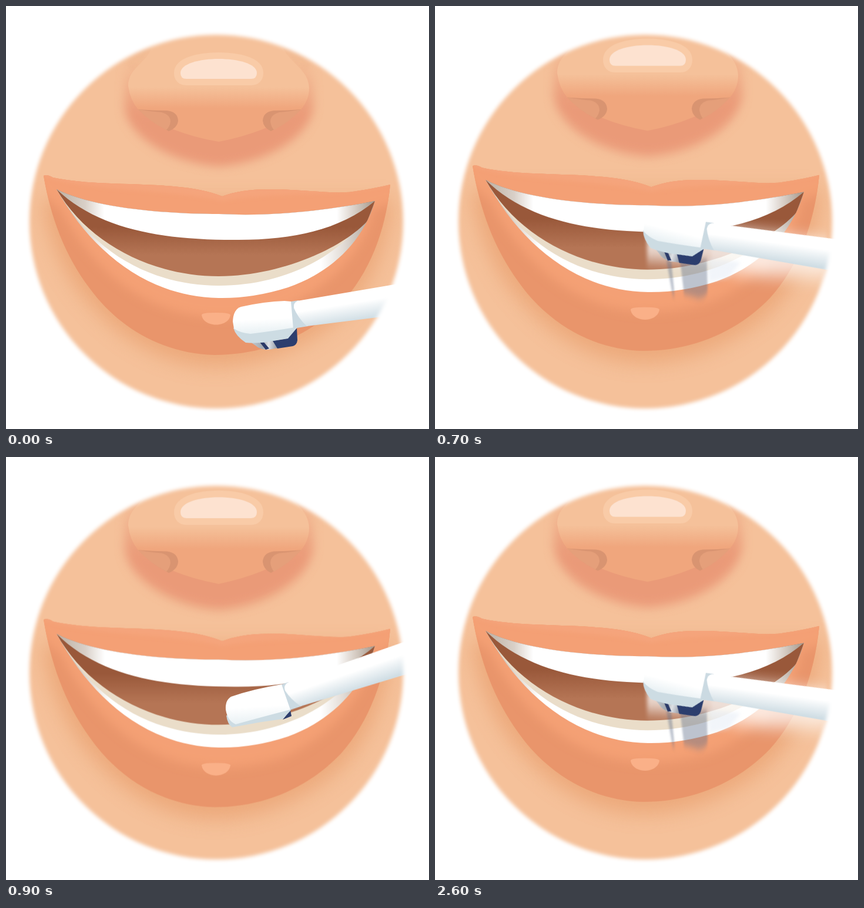
An HTML page that plays this animation: 720x720 px, repeating every 2800 ms.

```html
<!DOCTYPE html>
<html lang="en">
<head>
<meta charset="utf-8">
<title>Brushing</title>
<style>
  html, body { margin: 0; width: 100%; height: 100%; overflow: hidden; background: #fff; }
  svg { display: block; width: 100%; height: 100%; }
  .face, .brush, .side, .rolled, .back, .blur { animation: 2800ms step-end infinite; }
  .face { transform-origin: 0 0; animation-name: stretch; }
  .brush { transform-origin: 487px 503px; animation-name: move; }
  .side { animation-name: side; }
  .rolled { animation-name: rolled; }
  .back { animation-name: back; }
  .blur { animation-name: blur; }

  @keyframes stretch {
    0% { transform: none; }
    25%, 92.857% { transform: matrix(1, 0, 0, 1.0324, 0, -26.2); }
    32.143% { transform: matrix(1, 0, 0, 1.0466, 0, -25.7); }
    39.286% { transform: matrix(1, 0, 0, 1.0445, 0, -28.4); }
    100% { transform: none; }
  }
  @keyframes move {
    0% { transform: none; }
    17.857% { transform: translate(8px, 41px) rotate(-5.5deg); }
    25%, 92.857% { transform: translate(-24px, -135px) rotate(17deg); }
    32.143% { transform: translate(-17px, -116px) rotate(-9.7deg); }
    39.286% { transform: translate(-21px, -105px) rotate(-20deg); }
    100% { transform: none; }
  }
  @keyframes side { 0%, 92.857%, 100% { opacity: 1; } 32.143% { opacity: 0; } }
  @keyframes rolled { 0%, 39.286%, 100% { opacity: 0; } 32.143% { opacity: 1; } }
  @keyframes back { 0%, 92.857%, 100% { opacity: 0; } 39.286% { opacity: 1; } }
  @keyframes blur { 0%, 32.143%, 100% { opacity: 0; } 25%, 92.857% { opacity: 1; } }
</style>
</head>
<body>
<svg viewBox="0 0 720 720">
  <defs>
    <filter id="soft3" x="-10%" y="-10%" width="120%" height="120%"><feGaussianBlur stdDeviation="3"/></filter>
    <filter id="soft9" x="-20%" y="-20%" width="140%" height="140%"><feGaussianBlur stdDeviation="8"/></filter>
    <filter id="soft16" x="-20%" y="-20%" width="140%" height="140%"><feGaussianBlur stdDeviation="16"/></filter>
    <filter id="smear" x="-20%" y="-60%" width="140%" height="220%"><feGaussianBlur stdDeviation="3 12"/></filter>
    <filter id="streak" x="-30%" y="-30%" width="160%" height="160%"><feGaussianBlur stdDeviation="1.5 6"/></filter>
    <mask id="disc" maskUnits="userSpaceOnUse" x="0" y="0" width="720" height="720">
      <circle cx="358" cy="367" r="318" fill="#fff" filter="url(#soft3)"/>
    </mask>

    <g id="gradients">
      <linearGradient id="noseFill" gradientUnits="userSpaceOnUse" x1="0" y1="138" x2="0" y2="174">
        <stop stop-color="#f5c19a"/><stop offset="1" stop-color="#f0a67d"/>
      </linearGradient>
      <linearGradient id="noseShade" gradientUnits="userSpaceOnUse" x1="0" y1="95" x2="0" y2="185">
        <stop stop-color="#ea9a78" stop-opacity="0"/><stop offset="1" stop-color="#ea9a78"/>
      </linearGradient>
      <linearGradient id="throat" gradientUnits="userSpaceOnUse" x1="0" y1="376" x2="0" y2="424">
        <stop stop-color="#99583a"/><stop offset="1" stop-color="#b57555"/>
      </linearGradient>
      <linearGradient id="upperTeeth" gradientUnits="userSpaceOnUse" x1="86" y1="0" x2="628" y2="0">
        <stop stop-color="#bdb0a3"/><stop offset=".09" stop-color="#d9d0c8"/><stop offset=".15" stop-color="#fff"/>
        <stop offset=".88" stop-color="#fff"/><stop offset=".94" stop-color="#d5cbc2"/><stop offset="1" stop-color="#a4978b"/>
      </linearGradient>
      <linearGradient id="lowerTeeth" gradientUnits="userSpaceOnUse" x1="86" y1="0" x2="628" y2="0">
        <stop stop-color="#b9ada1"/><stop offset=".11" stop-color="#e5dfd9"/><stop offset=".17" stop-color="#fff"/>
        <stop offset=".83" stop-color="#fff"/><stop offset=".9" stop-color="#e2dcd6"/><stop offset="1" stop-color="#a99d92"/>
      </linearGradient>
      <linearGradient id="handleFill" gradientUnits="userSpaceOnUse" x1="580" y1="488" x2="588" y2="537">
        <stop offset=".38" stop-color="#fff"/><stop offset=".55" stop-color="#f1f5f7"/><stop offset="1" stop-color="#cfdde4"/>
      </linearGradient>
      <linearGradient id="headFill" x1="0" y1="0" x2=".1" y2="1">
        <stop offset=".6" stop-color="#fff"/><stop offset="1" stop-color="#e9f1f4"/>
      </linearGradient>
      <linearGradient id="bristle" gradientUnits="userSpaceOnUse" x1="412" y1="0" x2="462" y2="0">
        <stop stop-color="#c7d2d8"/><stop offset=".5" stop-color="#a3a8b0"/><stop offset=".7" stop-color="#dfe2e6"/><stop offset="1" stop-color="#8f96a4"/>
      </linearGradient>
    </g>

    <path id="lips" d="M64 289Q70 286 80 292C140 305 220 301 285 307Q335 311 368 324Q400 312 445 312C500 311 555 321 590 316Q625 311 654 304C646 385 618 455 570 507C515 562 440 594 355 594C265 592 190 546 142 480C100 424 76 360 64 289Z"/>
    <path id="mouth" d="M86 312C150 344 270 354 362 354C460 359 550 347 628 332C607 404 550 455 480 479Q420 498 362 497C240 495 145 417 86 312Z"/>
    <clipPath id="lipClip"><use href="#lips"/></clipPath>
    <clipPath id="mouthClip"><use href="#mouth"/></clipPath>
  </defs>

  <g mask="url(#disc)">
    <rect width="720" height="720" fill="#f5c19a"/>

    <g class="face">
      <g class="nose">
        <path d="M248 70Q238 96 216 110L204 100 226 70ZM470 70Q480 94 508 112L520 100 492 70Z" fill="#efb68e" opacity=".45" filter="url(#soft3)"/>
        <path d="M203 100L201 170C206 225 285 268 362 273C440 268 518 225 524 170L521 100Z" fill="url(#noseShade)" filter="url(#soft9)"/>
        <path d="M252 40L248 72C238 98 208 106 208 136Q211 160 225 176Q275 216 362 231Q442 216 502 176Q516 160 516 140C515 108 484 98 470 70L466 40Z" fill="url(#noseFill)"/>
        <path id="nostril" d="M225 176Q250 178 274 178Q292 180 293 195Q292 207 277 213Q248 199 225 176Z" fill="#d99471"/>
        <path d="M225 176Q250 180 265 181Q280 185 280 197Q279 205 273 211Q246 198 225 176Z" fill="#e59f7a"/>
        <path d="M502 176Q480 178 456 178Q438 180 437 195Q438 207 451 213Q480 199 502 176Z" fill="#d99471"/>
        <path d="M502 176Q480 180 465 181Q450 185 450 197Q451 205 456 211Q482 198 502 176Z" fill="#e59f7a"/>
        <g stroke-linejoin="round">
          <path d="M297 114C297 98 330 90 362 90S427 98 427 114Q427 124 417 124H307Q297 124 297 114Z" fill="#f9cba7" stroke="#f9cba7" stroke-width="22"/>
          <path d="M297 114C297 98 330 90 362 90S427 98 427 114Q427 124 417 124H307Q297 124 297 114Z" fill="#fde2d0"/>
        </g>
      </g>

      <path d="M62 330C70 400 105 470 150 515C205 575 280 614 358 614C445 612 530 570 580 520C625 470 650 400 658 330Z" fill="#e9a171" opacity=".75" filter="url(#soft16)"/>
      <use href="#lips" fill="#e9956b"/>
      <g clip-path="url(#lipClip)">
        <path d="M40 270H680V330L625 345C610 430 530 490 470 514Q410 532 355 530C240 525 150 455 92 345L60 320Z" fill="#f4a075" filter="url(#soft9)"/>
        <path d="M64 289C140 316 285 312 368 332C450 316 560 326 654 304V280H64Z" fill="#f5a47b" filter="url(#soft3)"/>
      </g>
      <path d="M333 526Q333 522 357 522T382 526C379 548 336 548 333 526Z" fill="#fab088"/>

      <use href="#mouth" fill="url(#lowerTeeth)"/>
      <g clip-path="url(#mouthClip)">
        <path d="M86 312C150 424 250 475 362 476C480 476 585 420 628 332Z" fill="#eaddc9"/>
        <path d="M86 312C140 405 250 460 362 460C470 460 575 410 615 366L628 332Z" fill="url(#throat)"/>
        <path d="M86 312C160 382 270 398 388 398C490 399 570 380 628 332L628 300H86Z" fill="url(#upperTeeth)"/>
      </g>
    </g>

    <g class="blur">
      <path d="M361 366L470 374 668 398 664 452 560 452 470 440 361 432Z" fill="#fff" opacity=".72" filter="url(#smear)"/>
      <path d="M470 412L664 445V474L520 464 470 446Z" fill="#fff" opacity=".3" filter="url(#smear)"/>
      <path d="M393 428L402 432 408 494 404 490ZM417 432H463L464 486Q460 497 448 497L424 490Z" fill="#62718b" opacity=".42" filter="url(#streak)"/>
      <path d="M464 430L520 436 500 462 466 470Z" fill="#e4ebf5" opacity=".5" filter="url(#soft3)"/>
    </g>

    <g class="brush">
      <g class="side">
        <path d="M410 568L462 562 464 582 446 585Q432 585 425 578Z" fill="url(#bristle)"/>
        <path d="M431 571L437 570 448 583 442 585Z" fill="#2b3a68"/>
        <path d="M454 570L478 566 495 548 496 569Q495 577 488 579L462 583Z" fill="#2c3e6e"/>
        <path d="M387 548Q391 562 408 573Q432 575 455 570L480 566 496 547 484 535Z" fill="#cddce3"/>
        <path d="M386 537Q387 516 400 512Q440 503 474 502L486 503 492 547Q450 554 416 558Q397 556 388 549Z" fill="url(#headFill)"/>
      </g>
      <path d="M485 503L498 501 514 545 489 549Z" fill="#cbdae2"/>
      <path d="M496 502L720 464V519L512 545Q497 531 490 514Q489 505 496 502Z" fill="url(#handleFill)"/>
    </g>

    <g class="rolled">
      <path d="M484 431L486 441 471 447Z" fill="#2c3e6e"/>
      <path d="M375 440Q377 455 385 460L435 451 471 446 485 431 470 415Z" fill="#cddce3"/>
      <path d="M374 430Q373 414 383 408Q420 395 469 387L484 430Q430 444 391 455Q377 449 374 430Z" fill="url(#headFill)"/>
    </g>

    <g class="back">
      <path d="M383 452L438 449 478 438 484 432 470 420Z" fill="#dfe8ec"/>
      <path d="M381 444Q381 436 401 424Q435 402 467 398L484 432Q455 446 425 450L384 452Q381 450 381 444Z" fill="#fff"/>
    </g>
  </g>
</svg>
</body>
</html>
```
